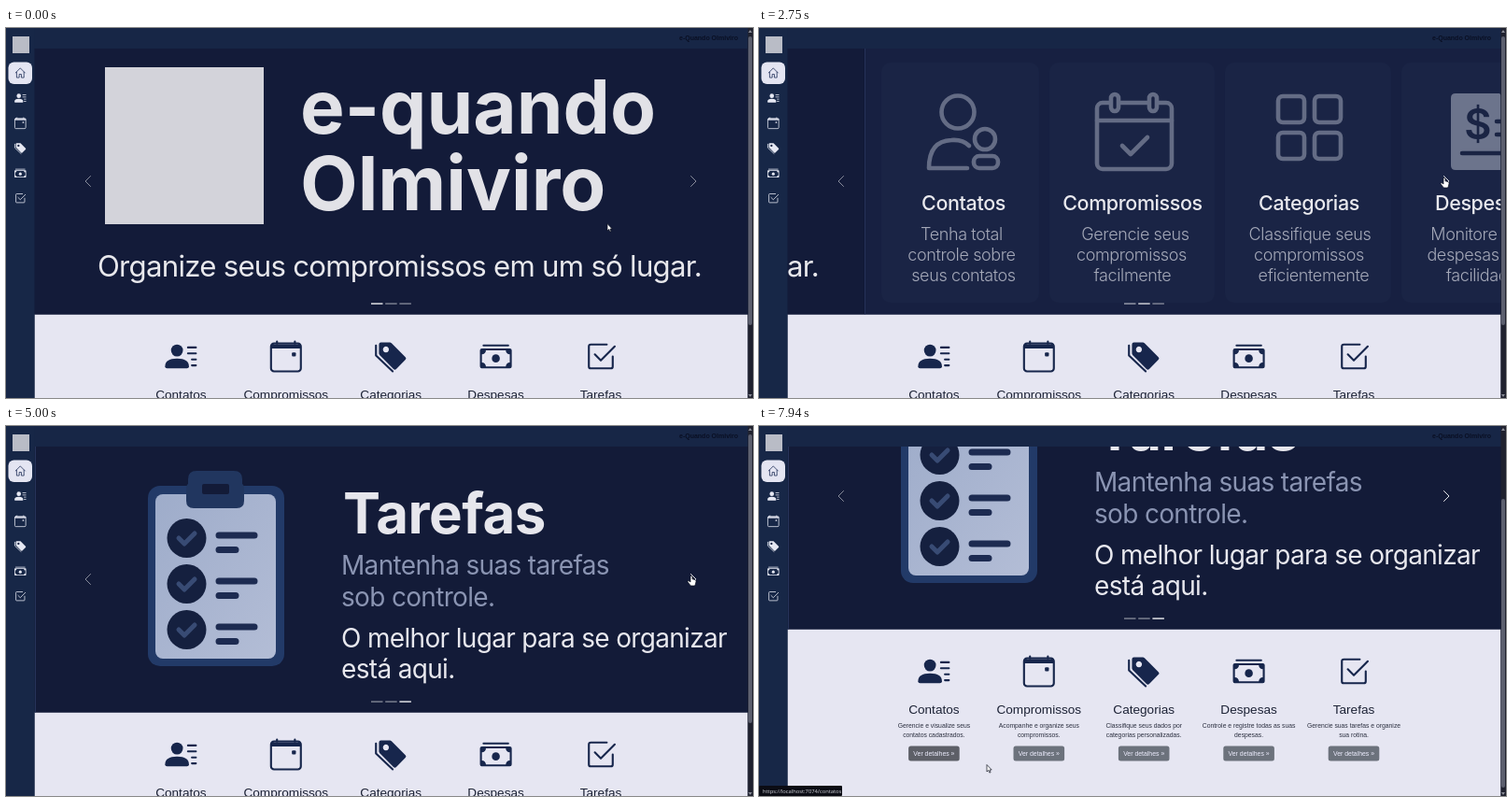
An HTML page that plays this animation: 800 px wide and 396 px high, repeating every 8000 ms.

```html
<!DOCTYPE html>
<html lang="pt">
<head>
<meta charset="utf-8">
<style>
html, body { margin: 0; width: 100%; height: 100%; overflow: hidden; background: #131c3b; }
svg { display: block; width: 800px; height: 396px; font-family: Inter, sans-serif; }
.ui { font-family: "Liberation Sans", Arial, sans-serif; }
.mid { text-anchor: middle; }
.tight { letter-spacing: -.024em; }
.ln { fill: none; stroke: currentColor; stroke-linecap: round; stroke-linejoin: round; }
</style>
</head>
<body>
<svg viewBox="0 0 800 396">
  <defs>
    <linearGradient id="paper" x2="1" y2="1"><stop stop-color="#9eacca"/><stop offset="1" stop-color="#b3bdd6"/></linearGradient>
    <clipPath id="view"><rect x="30.500" y="22" width="764" height="284.500"/></clipPath>
    <g id="home" class="ln"><path d="M1.5 8 8 1.5 14.5 8M3 7v7.5h3.5V10h3v4.5H13V7"/></g>
    <g id="contact"><circle cx="6" cy="5" r="3"/><path d="M0 13Q0 9 6 9t6 4q0 1-1 1H1q-1 0-1-1"/><path class="ln" d="M11.5 3.5h4m-4 3h4m-2 3h2m-2 3h2"/></g>
    <g id="calendar"><rect class="ln" x=".5" y="1.5" width="15" height="14" rx="1.5"/><path d="M.5 2h15v2H.5z"/><path class="ln" d="M3.5.5v1m9-1v1"/><rect x="11" y="6" width="2" height="2" rx=".5"/></g>
    <g id="tags"><path fill-rule="evenodd" d="M2 2q0-1 1-1h4.6l.7.3 7 7q.7.7 0 1.4l-4.6 4.6q-.7.7-1.4 0l-7-7-.3-.7zM5.5 3a1.5 1.5 0 1 0 .01 0z"/><path class="ln" d="M.5 2.5v5l8.4 8"/></g>
    <g id="cash"><path class="ln" d="M1.8 2.5h12.4"/><path fill-rule="evenodd" d="M0 5q0-1 1-1h14q1 0 1 1v8q0 1-1 1H1q-1 0-1-1zM3 5a2 2 0 0 1-2 2v4a2 2 0 0 1 2 2h10a2 2 0 0 1 2-2V7a2 2 0 0 1-2-2z"/><circle cx="8" cy="9" r="2"/></g>
    <g id="check" class="ln"><path d="M11 2H3Q2 2 2 3v10q0 1 1 1h10q1 0 1-1V8M5 7l3 3 7-7"/></g>
  </defs>

  <g id="page">
    <rect x="30.500" y="306.500" width="764" height="190" fill="#e6e6f2"/>
    <g clip-path="url(#view)">
      <g id="slides">
        <rect x="30" y="22" width="764" height="285" fill="#131b39"/>
        <rect x="106" y="42" width="170" height="168" fill="#d3d3da"/>
        <g fill="#e2e2e7" font-size="80" font-weight="700">
          <text x="315" y="113">e-quando</text><text x="315" y="195">Olmiviro</text>
        </g>
        <text class="tight" x="98" y="266" font-size="31.200" fill="#e8e8ec">Organize seus compromissos em um só lugar.</text>

        <g transform="translate(763)">
          <rect x="31" y="22" width="763" height="285" fill="#172041"/>
          <path d="M31.5 22v285" stroke="#27335a"/>
          <g id="cards" class="mid tight"></g>
          <g transform="translate(7)" color="#646c85" stroke-width="4.6">
            <g class="ln">
              <circle cx="124" cy="90" r="17.5"/><path d="M134 150H93q0-29 24-30 12-1 19 6"/>
              <circle cx="153" cy="119" r="11"/><rect x="141" y="137" width="26" height="13" rx="6"/>
              <rect x="273" y="80" width="80" height="71" rx="6"/><path d="M273 99h80m-53 27 9 9 18-18"/>
              <g fill="#172041"><rect x="288" y="71" width="8" height="18" rx="4"/><rect x="329" y="71" width="8" height="18" rx="4"/></g>
              <rect x="467" y="73" width="28" height="28" rx="5"/><rect x="506" y="73" width="28" height="28" rx="5"/>
              <rect x="467" y="112" width="28" height="28" rx="5"/><rect x="506" y="112" width="28" height="28" rx="5"/>
            </g>
            <path fill="#6c748c" d="M657 70h47l15 15v62q0 5-5 5h-57q-5 0-5-5V75q0-5 5-5"/>
            <text class="mid" x="681" y="119" font-size="45" font-weight="600" fill="#1a2444">$</text>
            <path class="ln" color="#1a2444" d="M701 100h8m-8 14h8m-45 20h45"/>
          </g>
        </g>

        <g transform="translate(1526)">
          <rect x="31" y="22" width="764" height="285" fill="#131b38"/>
          <path d="M31.5 22v285" stroke="#27335a"/>
          <rect x="152" y="64" width="146" height="193" rx="13" fill="#223a68"/>
          <rect x="160" y="73" width="129" height="176" rx="8" fill="url(#paper)"/>
          <path fill="#21365f" d="M204 48h40q9 0 9 9v5q2 1 2 6v12q0 8-8 8h-46q-8 0-8-8V68q0-5 2-6v-5q0-9 9-9"/>
          <rect x="210" y="62" width="29" height="11" rx="2" fill="#131b38"/>
          <g id="tasks"></g>
          <text x="361" y="115" font-size="60" font-weight="700" letter-spacing="-.5" fill="#e6e6ec">Tarefas</text>
          <g class="tight" font-size="28">
            <g fill="#8a94b2"><text x="359" y="159">Mantenha suas tarefas</text><text x="359" y="193">sob controle.</text></g>
            <g fill="#e8e8ee"><text x="359" y="237">O melhor lugar para se organizar</text><text x="359" y="270">está aqui.</text></g>
          </g>
        </g>
      </g>
      <g class="ln" color="#fff"><path opacity=".5" d="m90.500 158.500-5.500 5.500 5.500 5.500"/><path id="next" d="m733.500 158.500 5.500 5.500-5.500 5.500"/></g>
      <g id="dots" fill="#fff"></g>
    </g>
    <g id="links" class="ui mid"></g>
  </g>

  <rect x="30" width="765" height="22" fill="#172646"/>
  <rect width="30.500" height="396" fill="#172747"/>
  <text class="ui" x="721" y="13" font-size="7" font-weight="700" fill="#0a1024">e-Quando Olmiviro</text>
  <rect x="7" y="9" width="18" height="18" fill="#b9bcc6"/>
  <rect x="2.500" y="36.500" width="25.500" height="23.500" rx="6" fill="#e4e5f2"/>
  <g id="menu"></g>
  <rect x="794.500" width="6" height="396" fill="#20222f"/>
  <path fill="#8b8d98" d="m795 5 2-3 2 3zm0 387 2 3 2-3z"/>
  <rect id="thumb" x="795" width="4" height="309" rx="2" fill="#5d606f"/>
  <g id="url"><rect y="385" width="89" height="11" rx="1" fill="#0b0c14"/><text x="4" y="392.500" font-size="5.800" fill="#d8d9e0" font-family="Open Sans, sans-serif">https://localhost:7074/contatos</text></g>
  <g id="cursor" fill="#fff" stroke="#0a0e1c" stroke-width=".7" stroke-linejoin="round">
    <path id="arrow" d="M0 0v7.500l1.700-1.500 1.200 2.600 1.200-.5-1.200-2.600h2.300z"/>
    <path id="hand" d="M-1 .8Q0-.6 1 .8v3l3 .8q1.300.4 1 2l-.8 3.400q-.3 1-1.200 1h-3q-.8 0-1.300-.7L-4 6.700q-.2-1.300 1.200-.9L-1 7z"/>
  </g>
</svg>
<script>
const $ = id => document.getElementById(id);
const icons = ['contact', 'calendar', 'tags', 'cash', 'check'];
const names = ['Contatos', 'Compromissos', 'Categorias', 'Despesas', 'Tarefas'];
const text = (x, y, size, fill, s, more = '') => `<text x="${x}" y="${y}" font-size="${size}" fill="${fill}" ${more}>${s}</text>`;
const icon = (id, x, y, scale, color) => `<use href="#${id}" transform="translate(${x} ${y}) scale(${scale}) translate(-8 -8)" color="${color}" fill="${color}"/>`;

// Each card: left edge, width, title centre, then line text and centre
const cards = [
  [49, 169, 137, 'Tenha total', 135, 'controle sobre', 135, 'seus contatos', 137],
  [229, 177, 318, 'Gerencie seus', 321, 'compromissos', 317, 'facilmente', 318],
  [417, 178, 507, 'Classifique seus', 508, 'compromissos', 507, 'eficientemente', 512],
  [606, 170, 691, 'Monitore suas', 694, 'despesas com', 692, 'facilidade', 692]
];
$('cards').innerHTML = cards.map(([x, w, cx, ...lines], i) =>
  `<rect x="${x}" y="37" width="${w}" height="257" rx="10" fill="#1a2445"/>` +
  text(cx, 195, 21.5, '#e9e9ee', names[i], 'font-weight="500"') +
  [0, 1, 2].map(n => text(lines[2 * n + 1], 226.5 + 22.4 * n, 18, '#a4a8b8', lines[2 * n], 'font-weight="300"')).join('')).join('');

$('tasks').innerHTML = [120, 169, 218].map(y =>
  `<circle cx="193.500" cy="${y}" r="21" fill="#15203f"/>
  <path class="ln" color="#384b74" stroke-width="5" d="M185 ${y}l6 6 11-11"/>
  <path class="ln" color="#1d2b51" stroke-width="7" d="M228 ${y - 3}h38M228 ${y + 12.5}h18"/>`).join('');

$('dots').innerHTML = [391, 406.2, 421.4].map(x => `<rect x="${x}" y="294.400" width="12.500" height="1.300"/>`).join('');

const notes = [
  ['Gerencie e visualize seus', 'contatos cadastrados.'],
  ['Acompanhe e organize seus', 'compromissos.'],
  ['Classifique seus dados por', 'categorias personalizadas.'],
  ['Controle e registre todas as suas', 'despesas.'],
  ['Gerencie suas tarefas e organize', 'sua rotina.']
];
$('links').innerHTML = icons.map((id, i) => {
  const x = 187.4 + 112.4 * i;
  return icon(id, x, 351.5, 2.13, '#17264c') +
    text(x, 397.3, 13.6, '#1d2336', names[i]) +
    notes[i].map((s, n) => text(x, 411.5 + 10 * n, 6.8, '#2c3040', s)).join('') +
    `<rect class="btn" x="${x - 27.3}" y="431.500" width="54.600" height="16" rx="2.500" fill="#6c727c"/>` +
    text(x, 441.8, 6.9, '#eef', 'Ver detalhes »');
}).join('');

$('menu').innerHTML = icon('home', 15.3, 48, .78, '#1a2a54') +
  icons.map((id, i) => icon(id, 15.3, 75 + 26.8 * i, .78, '#e6e8f3')).join('');

const ramp = (t, start, dur) => Math.min(1, Math.max(0, (t - start) / dur));

// cubic-bezier(.42, 0, .58, 1)
function ease(x) {
  let lo = 0, hi = 1;
  for (let i = 0; i < 24; i++) {
    const u = (lo + hi) / 2, v = 1 - u;
    if (1.26 * u * v * v + 1.74 * u * u * v + u ** 3 < x) lo = u; else hi = u;
  }
  return lo * lo * (3 - 2 * lo);
}

// Pointer stops: time, x, y
const path = [
  [0, 644, 209.5], [810, 644, 209.5], [960, 647, 216], [1200, 690, 198], [1400, 739, 168], [1560, 734, 160],
  [6440, 734, 160], [6560, 690, 190], [6750, 420, 300], [6940, 225, 364], [7190, 225, 364],
  [7350, 192, 350], [7780, 196, 351], [7920, 244, 362.5], [8000, 244, 362.5]
];
function pointer(t) {
  const i = path.findIndex(p => p[0] > t), [t0, x0, y0] = path[i - 1], [t1, x1, y1] = path[i];
  const k = (t - t0) / (t1 - t0);
  return [x0 + (x1 - x0) * k, y0 + (y1 - y0) * k];
}

function draw(now) {
  const t = now % 8000;
  const a = ramp(t, 2265, 630), b = ramp(t, 4258, 697);
  const scroll = 41.67 * (ease(ramp(t, 5720, 160)) + ease(ramp(t, 6080, 160))) + 5.66 * ease(ramp(t, 6420, 100));
  $('slides').setAttribute('transform', `translate(${-763 * (ease(a) + ease(b))})`);
  $('page').setAttribute('transform', `translate(0 ${-scroll})`);
  $('thumb').setAttribute('y', 9 + scroll * .775);
  [1 - a, a - b, b].forEach((v, i) => $('dots').children[i].setAttribute('opacity', .5 + .5 * v));
  $('next').setAttribute('opacity', .5 + .4 * ramp(t, 1300, 150));

  const [x, y] = pointer(t);
  const onButton = x < 214.5 && y < 358.5 && t > 7000;
  const hand = x > 680 || onButton;
  $('cursor').setAttribute('transform', `translate(${x} ${y})`);
  $('hand').style.display = hand ? '' : 'none';
  $('arrow').style.display = hand ? 'none' : '';
  const hover = ramp(t, 7270, 150) - ramp(t, 7920, 150);
  document.querySelector('.btn').setAttribute('fill', `rgb(${108 - 18 * hover},${114 - 22 * hover},${124 - 24 * hover})`);
  $('url').setAttribute('opacity', ramp(t, 7330, 120));
  requestAnimationFrame(draw);
}
requestAnimationFrame(draw);
</script>
</body>
</html>
```
